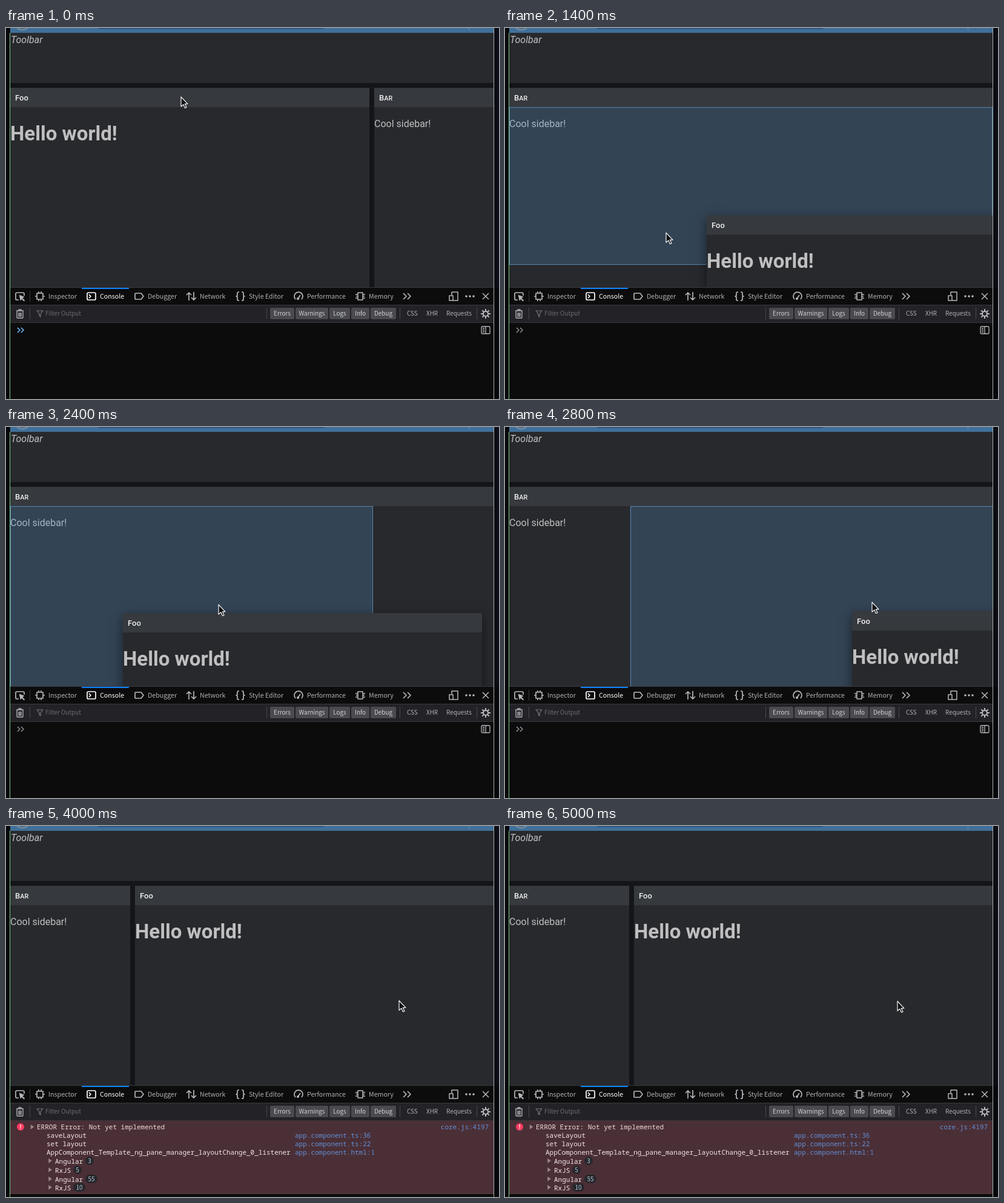
Recreate the animation shown at these times as an HTML page with a canvas. Size 814 by 614 pixels, loop 5100 ms.

```html
<!DOCTYPE html>
<html lang="en">
<head>
<meta charset="utf-8">
<title>Pane drag and drop</title>
<style>
  html, body { margin: 0; width: 100%; height: 100%; overflow: hidden; background: #08090c; }
  canvas { display: block; width: 814px; height: 614px; }
</style>
</head>
<body>
<canvas id="stage" width="814" height="614"></canvas>
<script>
const ctx = document.getElementById('stage').getContext('2d');
const LOOP = 5100, STEP = 100;
const PRESS = 300, LIFT = 400, DROP = 3100, EXPAND = 3300;
const UI = '"Noto Sans CJK JP", "Noto Sans CJK SC", "Noto Sans", sans-serif';
const MONO = '11px "Noto Sans Mono", monospace';
const ROBOTO = 'Roboto, sans-serif';

// Each key: time, then values
const cursorKeys = [
  [0, 289, 114], [300, 289, 114], [500, 325, 135], [700, 387, 167], [800, 404, 168],
  [1000, 405, 195], [1300, 323, 296], [1400, 266, 339], [1600, 175, 345], [1900, 105, 310],
  [2100, 110, 298], [2300, 183, 294], [2400, 351, 294], [2600, 520, 292], [2900, 649, 289],
  [4200, 649, 289], [5000, 648, 290]
];
// left, top, right, bottom, opacity
const hintKeys = [
  [700, 128, -20, 307, 224, 0], [800, 88, 30, 473, 243, .5], [1000, 7, 131, 805, 280, 1],
  [1300, 7, 131, 805, 280, 1], [1400, 7, 131, 805, 392, 1], [1500, 7, 131, 805, 432, 1],
  [1700, 7, 131, 805, 432, 1], [1900, 7, 131, 406, 432, 1], [2300, 7, 131, 406, 432, 1],
  [2400, 7, 131, 606, 432, 1], [2500, 7, 131, 805, 432, 1], [2700, 7, 131, 805, 432, 1],
  [2900, 406, 131, 805, 432, 1]
];

function sample(keys, t) {
  const next = keys.findIndex(k => k[0] > t);
  if (next === 0) return keys[0].slice(1);
  if (next < 0) return keys[keys.length - 1].slice(1);
  const a = keys[next - 1], b = keys[next], p = (t - a[0]) / (b[0] - a[0]);
  return a.slice(1).map((v, i) => v + (b[i + 1] - v) * p);
}

function rect(x, y, w, h, color) {
  ctx.fillStyle = color;
  ctx.fillRect(x, y, w, h);
}

function pill(x, y, w, h, r, color) {
  ctx.fillStyle = color;
  ctx.beginPath();
  ctx.roundRect(x, y, w, h, r);
  ctx.fill();
}

function text(str, x, y, font, color, align = 'left') {
  ctx.font = font;
  ctx.fillStyle = color;
  ctx.textAlign = align;
  ctx.fillText(str, x, y);
}

function icon(x, y, path, color = '#b8b8bc', width = 1.7, fill) {
  ctx.save();
  ctx.translate(x, y);
  const shape = new Path2D(path);
  if (fill) {
    ctx.fillStyle = fill;
    ctx.fill(shape);
  }
  ctx.strokeStyle = color;
  ctx.lineWidth = width;
  ctx.lineJoin = 'round';
  ctx.stroke(shape);
  ctx.restore();
}

function dot(x, y, r, color) {
  ctx.fillStyle = color;
  ctx.beginPath();
  ctx.arc(x, y, r, 0, Math.PI * 2);
  ctx.fill();
}

function pane(x, y, w, name, floating) {
  ctx.save();
  if (floating) {
    ctx.shadowColor = 'rgba(0,0,0,.5)';
    ctx.shadowBlur = 18;
    ctx.shadowOffsetY = 6;
  }
  rect(x, y, w, 331, '#28292d');
  ctx.restore();
  rect(x, y, w, 32, '#36393d');
  if (name === 'foo') {
    text('Foo', x + 8, y + 21, '500 13px ' + ROBOTO, '#f0f0f0');
    text('Hello world!', x, y + 87, 'bold 33px ' + ROBOTO, '#bfbfc0');
  } else {
    text('B', x + 8, y + 21, '500 13px ' + ROBOTO, '#f0f0f0');
    text('AR', x + 16.3, y + 21, '500 10.8px ' + ROBOTO, '#f0f0f0');
    text('Cool sidebar!', x, y + 65, '16px ' + ROBOTO, '#bfbfc0');
  }
}

function dropHint(t) {
  const [l, top, r, b, alpha] = sample(hintKeys, t);
  ctx.save();
  ctx.globalAlpha = alpha;
  rect(l, top, r - l, b - top, 'rgba(84,149,204,.25)');
  ctx.strokeStyle = 'rgba(110,170,220,.65)';
  ctx.lineWidth = 1;
  ctx.strokeRect(Math.round(l) + .5, Math.round(top) + .5, Math.round(r - l) - 1, Math.round(b - top) - 1);
  ctx.restore();
}

function page(t) {
  rect(0, 0, 814, 614, '#07080b');
  rect(806, 0, 8, 430, '#0b0c14');
  rect(7, 0, 798, 8, '#407099');
  rect(152, 0, 373, 1.5, '#264d7a');
  rect(764, 0, 1, 4, '#6c92b5');
  ctx.save();
  ctx.beginPath();
  ctx.rect(7, 0, 798, 8);
  ctx.clip();
  dot(27, -9, 13, '#8b9aa6');
  dot(27, -9, 11.8, '#4d7191');
  ctx.restore();

  ctx.save();
  ctx.beginPath();
  ctx.rect(7, 8, 798, 422);
  ctx.clip();
  rect(7, 8, 798, 422, '#131518');
  rect(7, 8, 798, 83, '#28292d');
  text('Toolbar', 8, 25, 'italic 16px ' + ROBOTO, '#bfbfc0');
  if (t < LIFT) {
    pane(7, 99, 593, 'foo');
    pane(608, 99, 197, 'bar');
  } else if (t < DROP) {
    pane(7, 99, 798, 'bar');
    if (t >= 700) dropHint(t);
    const [x, y] = sample(cursorKeys, t - 100);
    pane(Math.round(x + 10), Math.round(y + 14), 593, 'foo', true);
  } else {
    pane(7, 99, 198, 'bar');
    pane(213, 99, 592, 'foo');
  }
  ctx.restore();
}

function tabs() {
  rect(7, 430, 798, 184, '#0c0c0d');
  rect(7, 429, 798, 1, '#38383d');
  rect(125, 430, 78, 2, '#0a84ff');
  rect(39, 435, 1, 18, '#38383d');
  const labels = [['Inspector', 70], ['Console', 155], ['Debugger', 234], ['Network', 320],
    ['Style Editor', 401], ['Performance', 497], ['Memory', 599]];
  for (const [label, x] of labels)
    text(label, x, 448, '10.65px ' + UI, label === 'Console' ? '#ffffff' : '#b1b1b3');

  icon(23, 444, 'M-2 6H-5Q-7 6-7 4V-4Q-7-6-5-6H5Q7-6 7-4V-1');
  icon(23, 444, 'M-1-2L7 1L4 3L8 7L6.5 8L3 4.5L1 7Z', '#b8b8bc', .6, '#b8b8bc');
  icon(56, 444, 'M-5-5H5V5H-5ZM-2-5V-8M2-5V-8M-2 5V8M2 5V8M-5 0H-8M5 0H8');
  icon(141, 444, 'M-5-6H5Q7-6 7-4V4Q7 6 5 6H-5Q-7 6-7 4V-4Q-7-6-5-6ZM-4-3L-1 0L-4 3', '#ffffff');
  icon(220, 444, 'M-6-5H3L7 0L3 5H-6Q-7 5-7 4V-4Q-7-5-6-5Z');
  icon(306, 444, 'M-4 7V-6M-8-2L-4-6L0-2M4-7V6M0 2L4 6L8 2');
  icon(387, 444, 'M-2-7H-3Q-5-7-5-5V-2Q-5 0-7 0Q-5 0-5 2V5Q-5 7-3 7H-2M2-7H3Q5-7 5-5V-2Q5 0 7 0Q5 0 5 2V5Q5 7 3 7H2');
  icon(483, 444, 'M-5 5A7 7 0 1 1 5 5M-1 4L3-2');
  dot(482, 448, 2, '#b8b8bc');
  icon(585, 444, 'M-4-6H4V6H-4ZM-4-3H-8M-4 0H-7M-4 3H-8M4-3H8M4 0H7M4 3H8', '#b8b8bc', 1.5);
  icon(662, 444, 'M-6-5L-1 0L-6 5M1-5L6 0L1 5');
  icon(739, 444, 'M-3-2V-7H7V7H-1M-7-1H-1V7H-7Z', '#b8b8bc', 1.5);
  for (const x of [760, 766, 772]) dot(x, 444, 1.8, '#b8b8bc');
  icon(792, 444, 'M-5-5L5 5M5-5L-5 5', '#b8b8bc', 1.5);
}

function filters() {
  rect(7, 458, 798, 1, '#38383d');
  rect(7, 459, 798, 28, '#232327');
  rect(7, 487, 798, 1, '#38383d');
  for (const x of [39, 430, 650, 777]) rect(x, 463, 1, 19, '#48484d');
  icon(23, 473, 'M-6-5H6M-2-5V-7H2V-5M-5-4V6Q-5 7-4 7H4Q5 7 5 6V-4M-2-2V5M0-2V5M2-2V5', '#b8b8bc', 1.3);
  icon(56, 473, 'M-5-5H5L1 0V5L-1 3V0Z', '#77777c', 1.2);
  const font = '9.9px ' + UI;
  text('Filter Output', 65, 476, font, '#6c6c72');
  for (const [label, x, w] of [['Errors', 436, 40], ['Warnings', 478, 54], ['Logs', 534, 34],
    ['Info', 570, 30], ['Debug', 602, 42]]) {
    pill(x, 463, w, 19, 2, '#4a4a4f');
    text(label, x + w / 2, 476, font, '#d0d4da', 'center');
  }
  for (const [label, x] of [['CSS', 662], ['XHR', 694], ['Requests', 727]])
    text(label, x, 476, font, '#b1b1b3');

  ctx.save();
  ctx.translate(792, 473);
  for (let i = 0; i < 8; i++) {
    ctx.rotate(Math.PI / 4);
    rect(-1, -8, 2, 4, '#b8b8bc');
  }
  ctx.restore();
  icon(792, 473, 'M-4 0A4 4 0 1 1 4 0A4 4 0 1 1-4 0', '#b8b8bc', 2);
}

function triangle(x, y) {
  icon(x, y, 'M-2-3.5L3 0L-2 3.5Z', '#98868b', .5, '#98868b');
}

function errorLog(expanded) {
  rect(7, 488, 798, expanded ? 120 : 20, '#4b2f36');
  rect(7, expanded ? 608 : 508, 798, 1, '#623c45');
  dot(24, 498, 6, expanded ? '#ff3b5f' : '#b96b50');
  text('!', 24, 502, 'bold 10px ' + ROBOTO, '#ffe9ec', 'center');
  triangle(43, 498);
  text('ERROR Error: Not yet implemented', 51, 502, MONO, '#ecdcdc');
  const link = '#608fd6';
  text('core.js:4197', 797, 502, MONO, link, 'right');
  if (!expanded) return;
  const calls = [['saveLayout', 'app.component.ts:36'], ['set layout', 'app.component.ts:22'],
    ['AppComponent_Template_ng_pane_manager_layoutChange_0_listener', 'app.component.html:1']];
  calls.forEach(([name, place], i) => {
    text(name, 67, 516 + i * 14, MONO, '#f2e6e6');
    text(place, 477, 516 + i * 14, MONO, link);
  });
  const groups = [['Angular', '3'], ['RxJS', '5'], ['Angular', '55'], ['RxJS', '10']];
  groups.forEach(([name, count], i) => {
    const y = Math.round(554.3 + i * 14.6), x = name === 'RxJS' ? 111 : 131;
    triangle(72.5, y);
    text(name, 81, y + 5, MONO, '#f2e6e6');
    const w = 8 + 6 * count.length;
    pill(x, y - 7, w, 14, 7, '#27272c');
    text(count, x + w / 2, y + 4, '10px ' + UI, '#b4c6d8', 'center');
  });
}

function consoleArea(t) {
  const failed = t >= DROP, expanded = t >= EXPAND;
  if (failed) errorLog(expanded);
  if (expanded) return;
  const y = failed ? 521 : 500;
  icon(24, y, 'M-5-4L-1 0L-5 4M1-4L5 0L1 4', t < PRESS ? '#75bfff' : '#8d8d92', 1.6);
  icon(792, y, 'M-5-6H5Q7-6 7-4V4Q7 6 5 6H-5Q-7 6-7 4V-4Q-7-6-5-6ZM0-6V6M-5-3H-2M-5 0H-2M-5 3H-2', '#b8b8bc', 1.3);
}

function pointer(t) {
  const [x, y] = sample(cursorKeys, t).map(Math.round);
  icon(x, y, 'M0 0V16L3.8 12.6L6.5 18.5L9 17.4L6.4 11.6H11Z', '#f4f4f4', 1.2, '#101114');
}

function draw(t) {
  page(t);
  tabs();
  filters();
  consoleArea(t);
  rect(6, 8, 1, 606, '#82c98a');
  rect(805, 0, 1, 614, '#a9b1ab');
  pointer(t);
}

const start = performance.now();
function tick() {
  const t = (performance.now() - start) % LOOP;
  draw(Math.floor(t / STEP) * STEP);
  requestAnimationFrame(tick);
}
tick();
</script>
</body>
</html>
```
